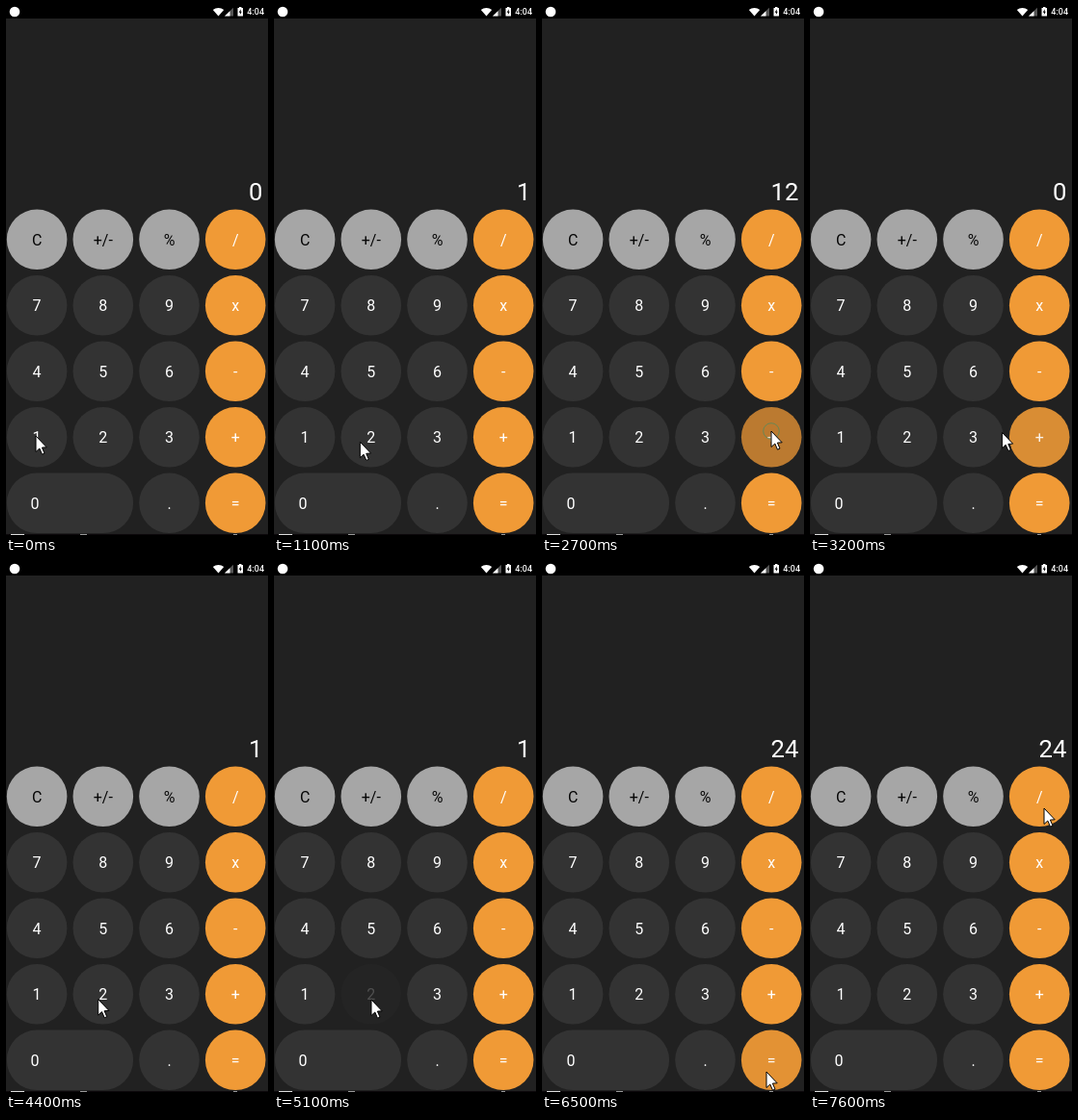
Recreate the animation shown at these times as an HTML page with a canvas. Size 272x550 px, loop 8 s.

```html
<!DOCTYPE html>
<html lang="en">
<head>
<meta charset="utf-8">
<title>Calculator</title>
<style>
  html, body { margin: 0; width: 100%; height: 100%; overflow: hidden; background: #212121; }
  canvas { display: block; }
</style>
</head>
<body>
<canvas id="stage" width="272" height="550"></canvas>
<script>
const ctx = document.getElementById('stage').getContext('2d');
const LOOP = 8000, STEP = 100, TRAVEL = 600, DIP = 150, RECOVER = 250;
const BACK = '#212121', DARK = '#333333', GRAY = '#a6a6a6', ORANGE = '#f09a36';
const RADIUS = 31.3, PITCH_X = 68.7, PITCH_Y = 68.5;
const ROWS = ['C +/- % /', '7 8 9 x', '4 5 6 -', '1 2 3 +', '0  . ='].map(row => row.split(' '));

// The pointer rests at (x, y) for each press and leaves for the next one on release
const PRESSES = [
  { key: '1', down: 220, up: 700, x: 31, y: 447, shows: '1' },
  { key: '2', down: 1680, up: 1840, x: 106, y: 455, shows: '12' },
  { key: '+', down: 2640, up: 3015, x: 238, y: 442, shows: '0' },
  { key: '1', down: 3600, up: 3920, x: 35, y: 449, shows: '1' },
  { key: '2', down: 4740, up: 5210, x: 101, y: 454, shows: '12' },
  { key: '=', down: 5940, up: 6300, x: 233, y: 529, shows: '24', linger: 680 }
];
const EXIT = { x: 243, y: 255 };

const clamp = v => Math.max(0, Math.min(1, v));
const mix = (a, b, p) => a + (b - a) * p;
const ease = p => p < 0.5 ? 2 * p * p : 1 - 2 * (1 - p) ** 2;

function pointerAt(t) {
  const leaving = press => press.up + (press.linger || 0);
  const i = PRESSES.findLastIndex(press => leaving(press) <= t);
  if (i < 0) return PRESSES[0];
  const from = PRESSES[i], to = PRESSES[i + 1] || EXIT;
  const p = ease(clamp((t - leaving(from)) / TRAVEL));
  return { x: mix(from.x, to.x, p), y: mix(from.y, to.y, p) };
}

function keyOpacity(key, t) {
  const press = PRESSES.find(p => p.key === key && t >= p.down && t < p.up + RECOVER);
  if (!press) return 1;
  return t < press.up ? mix(1, 0.2, ease(clamp((t - press.down) / DIP)))
                      : mix(0.2, 1, ease((t - press.up) / RECOVER));
}

function text(str, x, y, font, color, align = 'center') {
  ctx.font = font + ' Roboto, sans-serif';
  ctx.fillStyle = color;
  ctx.textAlign = align;
  ctx.fillText(str, x, y);
}

function polygon(color, ...points) {
  ctx.beginPath();
  points.forEach(([x, y]) => ctx.lineTo(x, y));
  ctx.closePath();
  ctx.fillStyle = color;
  ctx.fill();
}

function rect(x, y, w, h, color, radius = 0) {
  ctx.beginPath();
  ctx.roundRect(x, y, w, h, radius);
  ctx.fillStyle = color;
  ctx.fill();
}

function drawSystemBars() {
  rect(0, 0, 272, 13, '#000');
  rect(3.7, 0.7, 10.6, 10.6, '#fff', 5.3);
  ctx.beginPath();
  ctx.moveTo(220.5, 10.5);
  ctx.arc(220.5, 10.5, 8.6, -Math.PI * 0.73, -Math.PI * 0.27);
  ctx.fillStyle = '#fff';
  ctx.fill();
  polygon('#555', [227, 10.5], [236, 10.5], [236, 1.8]);
  polygon('#fff', [227, 10.5], [232.5, 10.5], [232.5, 5.2]);
  rect(240.5, 2, 5.5, 8.5, '#fff');
  rect(242, 1, 2.5, 1, '#fff');
  polygon('#000', [243.7, 3.2], [241.7, 6.7], [243, 6.7], [242.8, 9.2], [244.8, 5.7], [243.7, 5.7]);
  text('4:04', 268, 9.3, '500 9px', '#fff', 'right');

  rect(0, 549, 272, 1, '#0c080b');
  rect(5, 549, 14, 1, '#ddd');
  rect(77, 549, 7, 1, '#999');
  rect(236, 549, 4, 1, '#999');
}

function drawKey(label, col, row, t) {
  const x = 32.1 + col * PITCH_X, y = 242.8 + row * PITCH_Y, wide = label === '0';
  const color = col === 3 ? ORANGE : row === 0 ? GRAY : DARK;
  ctx.globalAlpha = keyOpacity(label, t);
  rect(x - RADIUS, y - RADIUS, 2 * RADIUS + (wide ? PITCH_X : 0), 2 * RADIUS, color, RADIUS);
  text(label, wide ? 30 : x, y + 5.9, '16px', color === GRAY ? '#060606' : '#fff');
  ctx.globalAlpha = 1;
}

function drawRing({ x, y, down }, t) {
  const age = t - down;
  if (age < 0 || age > 340) return;
  ctx.beginPath();
  ctx.arc(x, y, 29 * clamp(age / 210), 0, 2 * Math.PI);
  ctx.strokeStyle = `rgba(0, 150, 130, ${0.5 * (1 - age / 480)})`;
  ctx.lineWidth = 1;
  ctx.stroke();
}

function drawPointer({ x, y }) {
  ctx.save();
  ctx.translate(x, y);
  polygon('#fff', [0, 0], [0, 16.5], [3.8, 13], [6.5, 19.2], [9, 18.1], [6.4, 12.1], [11.2, 11.8]);
  ctx.strokeStyle = '#000';
  ctx.lineWidth = 1;
  ctx.stroke();
  ctx.restore();
}

function frame(now) {
  const t = Math.floor(now % LOOP / STEP) * STEP;
  const last = PRESSES.findLast(press => press.up <= t);
  rect(0, 0, 272, 550, BACK);
  text(last ? last.shows : '0', 266.4, 202, '25.7px', '#fff', 'right');
  ROWS.forEach((row, r) => row.forEach((label, c) => label && drawKey(label, c, r, t)));
  drawSystemBars();
  PRESSES.forEach(press => drawRing(press, t));
  drawPointer(pointerAt(t));
  requestAnimationFrame(() => frame(performance.now() - start));
}

const start = performance.now();
frame(0);
</script>
</body>
</html>
```
